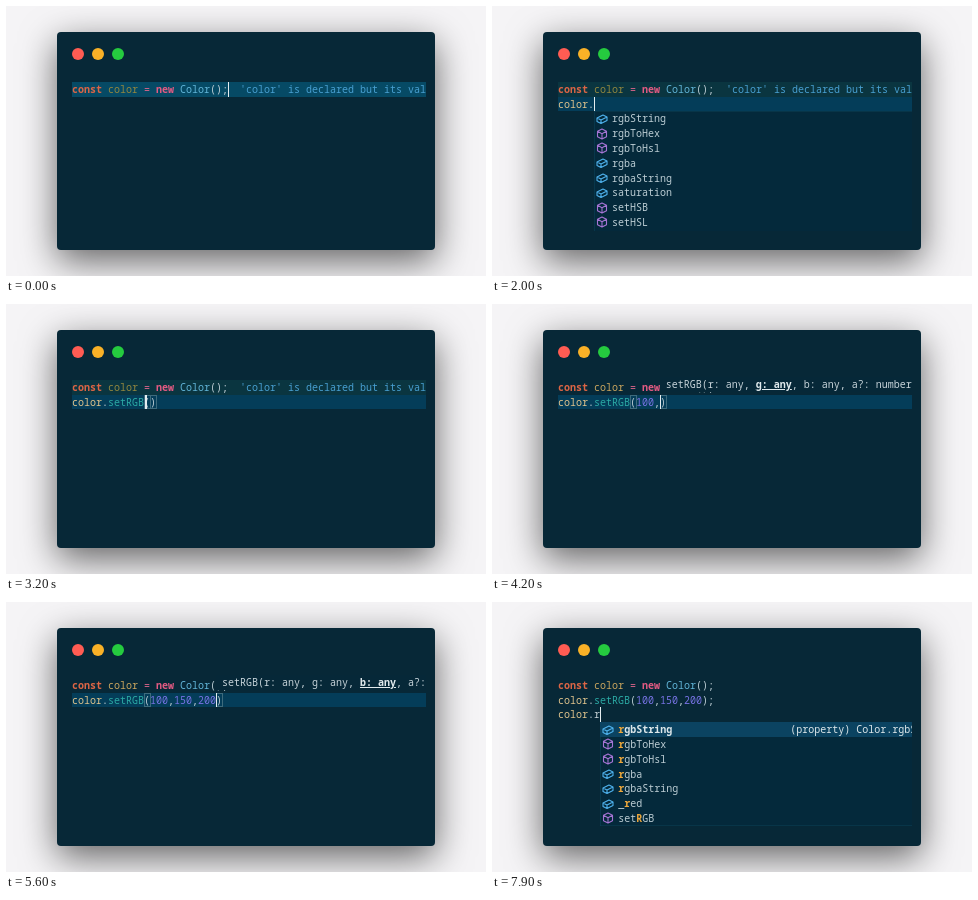
An HTML page for the animation above (8000 ms loop, 480x270 px).

```html
<!DOCTYPE html>
<html lang="en">
<head>
<meta charset="utf-8">
<title>Typing in a code editor</title>
<style>
html, body { margin: 0; width: 100%; height: 100%; overflow: hidden; background: #f5f4f6; }
#stage { position: relative; width: 480px; height: 270px; overflow: hidden; }
#win {
  position: absolute; left: 51px; top: 26px; width: 378px; height: 218px;
  border-radius: 4px; background: #072837; box-shadow: 0 11px 36px rgba(0, 0, 0, .6);
}
.dot { position: absolute; top: 15.5px; width: 12.5px; height: 12.5px; border-radius: 50%; }
#code {
  position: absolute; left: 66px; top: 72px; width: 353.5px; height: 152.5px; overflow: hidden;
  font: 500 10px/14.8px "Noto Sans Mono", "DejaVu Sans Mono", monospace;
  color: #bccdd4; white-space: pre; font-variant-ligatures: none;
}
#code div, #code svg { position: absolute; }
.line { left: 0; width: 100%; height: 14.8px; }
.caret { width: 1.2px; height: 14.8px; background: #e4edf0; }
.match { width: 5px; height: 12.4px; border: 1px solid #3d6b7d; }
.pop { width: 334px; background: #04293b; box-shadow: inset 0 0 0 .6px #0d4257; }
.item { left: 0; width: 334px; height: 14.8px; }
.item.sel { background: #0b4361; color: #dde7ea; }
.item svg { left: 2px; top: 1.4px; width: 12px; height: 12px; fill: none; stroke-width: 1.1; stroke-linejoin: round; }
.label { left: 18px; }
.sel .label.bold { font-weight: 700; }
.label b { color: #eda83c; font-weight: 700; }
.old { text-decoration: line-through; color: #7d929b; }
.hint { top: 1px; height: 14.8px; padding-left: 5.5px; width: 400px; background: #062838; color: #c6d3d9; }
.hint b { text-decoration: underline; color: #e2ebee; }
</style>
</head>
<body>
<div id="stage">
  <div id="win">
    <div class="dot" style="left:14.5px;background:#ff5c53"></div>
    <div class="dot" style="left:34.5px;background:#f9b127"></div>
    <div class="dot" style="left:54.5px;background:#25cb3f"></div>
  </div>
  <div id="code"></div>
</div>
<script>
const LOOP = 8000, CH = 6.02, ROW = 14.8, TOP = 3.8;
const code = document.getElementById('code');

const ICONS = {
  field: ['#4fb3ee', 'M1 5 7 2 11 4 11 7.5 5 10.5 1 8.5ZM1 5 5 7 11 4M5 7V10.5'],
  method: ['#a574d4', 'M6 1 10.5 3.3V8.7L6 11 1.5 8.7V3.3ZM1.5 3.3 6 5.7 10.5 3.3M6 5.7V11'],
  wrench: ['#c3d0d5', 'M10.5 3 8.5 4.5 7 3 8.8 1.2A3.2 3.2 0 0 0 5 5.2L1.2 9 3 10.8 6.8 7A3.2 3.2 0 0 0 10.5 3Z'],
  value: ['#4fb3ee', 'M3 2.5H1V9.5H3M9 2.5H11V9.5H9M3.5 6 6 4 8.5 5.5 6 8ZM6 8V5.8L8.5 5.5'],
  word: ['#b9c8ce', 'M1 2H5M7 2H11M1 4.7H7M9 4.7H11M1 7.3H4M6 7.3H11M1 10H8']
};

// Each entry is an icon key and a label.
const parse = s => s.split(' ').map(w => w.split(':'));
const LISTS = {
  c: parse('wrench:c value:color value:caches method:cancelAnimationFrame method:captureEvents word:case word:catch'),
  co: parse('value:color value:console word:const word:continue method:confirm value:cookieStore method:close'),
  col: parse('value:color method:cancelIdleCallback value:customElements'),
  all: parse('field:_alpha field:_blue field:_green field:_red field:brightness field:hexString field:hslString ' +
    'method:hslToRgb field:hslaString field:hue field:rgbString method:rgbToHex method:rgbToHsl field:rgba ' +
    'field:rgbaString field:saturation method:setHSB method:setHSL method:setRGB'),
  s: parse('field:saturation method:setHSB method:setHSL method:setRGB field:rgbString field:rgbaString method:rgbToHsl'),
  set: parse('method:setHSB method:setHSL method:setRGB'),
  setR: parse('method:setRGB'),
  r: parse('field:rgbString method:rgbToHex method:rgbToHsl field:rgba field:rgbaString field:_red method:setRGB')
};
const DETAILS = {
  c: ['Emmet Abbreviation', 218],
  color: ['const color: Color', 218],
  rgbString: ['(property) Color.rgbString', 190]
};

// [time, row, text, caret column, list, matched prefix]
const STEPS = [
  [0, 0, '', 26],
  [300, 1, '', 0],
  [500, 1, 'c', 1, 'c', 'c'],
  [600, 1, 'co', 2, 'c', 'c'],
  [700, 1, 'col', 3, 'co', 'co'],
  [800, 1, 'colo', 4, 'col', 'colo'],
  [900, 1, 'color', 5, 'col', 'color'],
  [1000, 1, 'color.', 6],
  [1100, 1, 'color.', 6, 'all', ''],
  [2500, 1, 'color.s', 7, 's', 's'],
  [2600, 1, 'color.se', 8, 'set', 'se'],
  [2700, 1, 'color.set', 9, 'set', 'set'],
  [2800, 1, 'color.setR', 10, 'setR', 'setR'],
  [2900, 1, 'color.setRG', 11, 'setR', 'setRG'],
  [3000, 1, 'color.setRGB', 12, 'setR', 'setRGB'],
  [3200, 1, 'color.setRGB()', 12.25],
  [3300, 1, 'color.setRGB()', 13],
  [3700, 1, 'color.setRGB(1)', 14],
  [3800, 1, 'color.setRGB(10)', 15],
  [3900, 1, 'color.setRGB(100)', 16],
  [4200, 1, 'color.setRGB(100,)', 17],
  [4600, 1, 'color.setRGB(100,1)', 18],
  [4700, 1, 'color.setRGB(100,15)', 19],
  [4800, 1, 'color.setRGB(100,150)', 20],
  [5100, 1, 'color.setRGB(100,150,)', 21],
  [5400, 1, 'color.setRGB(100,150,2)', 22],
  [5500, 1, 'color.setRGB(100,150,20)', 23],
  [5600, 1, 'color.setRGB(100,150,200)', 24],
  [6000, 1, 'color.setRGB(100,150,200)', 25],
  [6200, 1, 'color.setRGB(100,150,200);', 26],
  [6500, 2, '', 0],
  [6800, 2, 'c', 1, 'c', 'c'],
  [7000, 2, 'co', 2, 'c', 'c'],
  [7100, 2, 'col', 3, 'co', 'co'],
  [7200, 2, 'colo', 4, 'col', 'colo'],
  [7300, 2, 'color', 5, 'col', 'color'],
  [7500, 2, 'color.', 6],
  [7600, 2, 'color.', 6, 'all', ''],
  [7900, 2, 'color.r', 7, 'r', 'r']
];

const paint = (s, color, bold) => `<span style="color:${color}${bold ? ';font-weight:700' : ''}">${s}</span>`;

function callLine(s) {
  return s.replace(/\d+|\.\w+|\w+/g, w =>
    /^\d/.test(w) ? paint(w, '#7672e2') :
    w[0] === '.' ? '.' + paint(w.slice(1), w[1] === 's' ? '#2ba9a4' : '#c6d2d6') :
    paint(w, '#dfc38c'));
}

function firstLine(unused) {
  return paint('const', '#dc6545', true) + ' ' + paint('color', unused ? '#92873f' : '#caa65e') + ' ' +
    paint('=', '#e0668c') + ' ' + paint('new', '#e45b83', true) + ' ' + paint('Color', '#62b5d8') + '();' +
    (unused ? paint("  'color' is declared but its value is never read.", '#489fd0') : '');
}

const box = (cls, x, y, inner = '', style = '') =>
  `<div class="${cls}" style="left:${x}px;top:${y}px;${style}">${inner}</div>`;
const line = (row, inner, bg = 'none') => box('line', 0, TOP + row * ROW, inner, `background:${bg}`);

function mark(label, prefix) {
  const at = label.toLowerCase().indexOf(prefix.toLowerCase());
  if (!prefix || at < 0) return label;
  const end = at + prefix.length;
  return label.slice(0, at) + `<b>${label.slice(at, end)}</b>` + label.slice(end);
}

function popup(key, prefix, row, col, scroll) {
  const items = LISTS[key].slice(scroll);
  const rows = items.map(([icon, label], i) => {
    const sel = i + scroll === 0;
    const [color, path] = ICONS[icon];
    const old = label === 'captureEvents' ? ' old' : '';
    const bold = key === 'c' ? '' : ' bold';
    const detail = sel && DETAILS[label];
    return box('item' + (sel ? ' sel' : ''), 0, i * ROW,
      `<svg viewBox="0 0 12 12" stroke="${color}"><path d="${path}"/></svg>` +
      `<div class="label${old}${bold}">${mark(label, prefix)}</div>` +
      (detail ? box('', detail[1], 0, detail[0]) : ''));
  }).join('');
  return box('pop', col * CH, TOP + (row + 1) * ROW, rows, `height:${items.length * ROW}px`);
}

function hint(col, arg) {
  const args = ['r: any', 'g: any', 'b: any', 'a?: number'];
  args[arg] = `<b>${args[arg]}</b>`;
  return box('hint', col * CH, 1, `setRGB(${args.join(', ')}): void`);
}

function draw(t, [, row, text, col, list, prefix]) {
  const unused = t < 3400;
  const lineBg = '#043d59';
  let html = line(0, firstLine(unused), row === 0 ? '#064a65' : unused ? '#0a3540' : 'none');
  if (row === 1) html += line(1, callLine(text), lineBg);
  if (row === 2) html += line(1, callLine('color.setRGB(100,150,200);')) + line(2, callLine(text));

  if (row === 1 && text.endsWith(')')) {
    for (const c of [12, text.length - 1]) html += box('match', c * CH, TOP + ROW);
    if (t >= 3400 && t < 6000) html += hint(col, text.split(',').length - 1);
  }
  html += box('caret', col * CH - .4, TOP + row * ROW);
  if (list) {
    const scroll = list === 'all' && row === 1 ? scrollAt(t) : 0;
    html += popup(list, prefix, row, col, scroll);
  }
  return html;
}

const scrollAt = t => Math.max(0, Math.min(10, Math.floor((t - 1200) / 700 * 10)));

let shown = '';
const start = performance.now();
function frame(now) {
  const t = Math.max(0, now - start) % LOOP;
  const step = STEPS.findLast(s => s[0] <= t);
  const html = draw(t, step);
  if (html !== shown) code.innerHTML = shown = html;
  requestAnimationFrame(frame);
}
frame(start);
</script>
</body>
</html>
```
